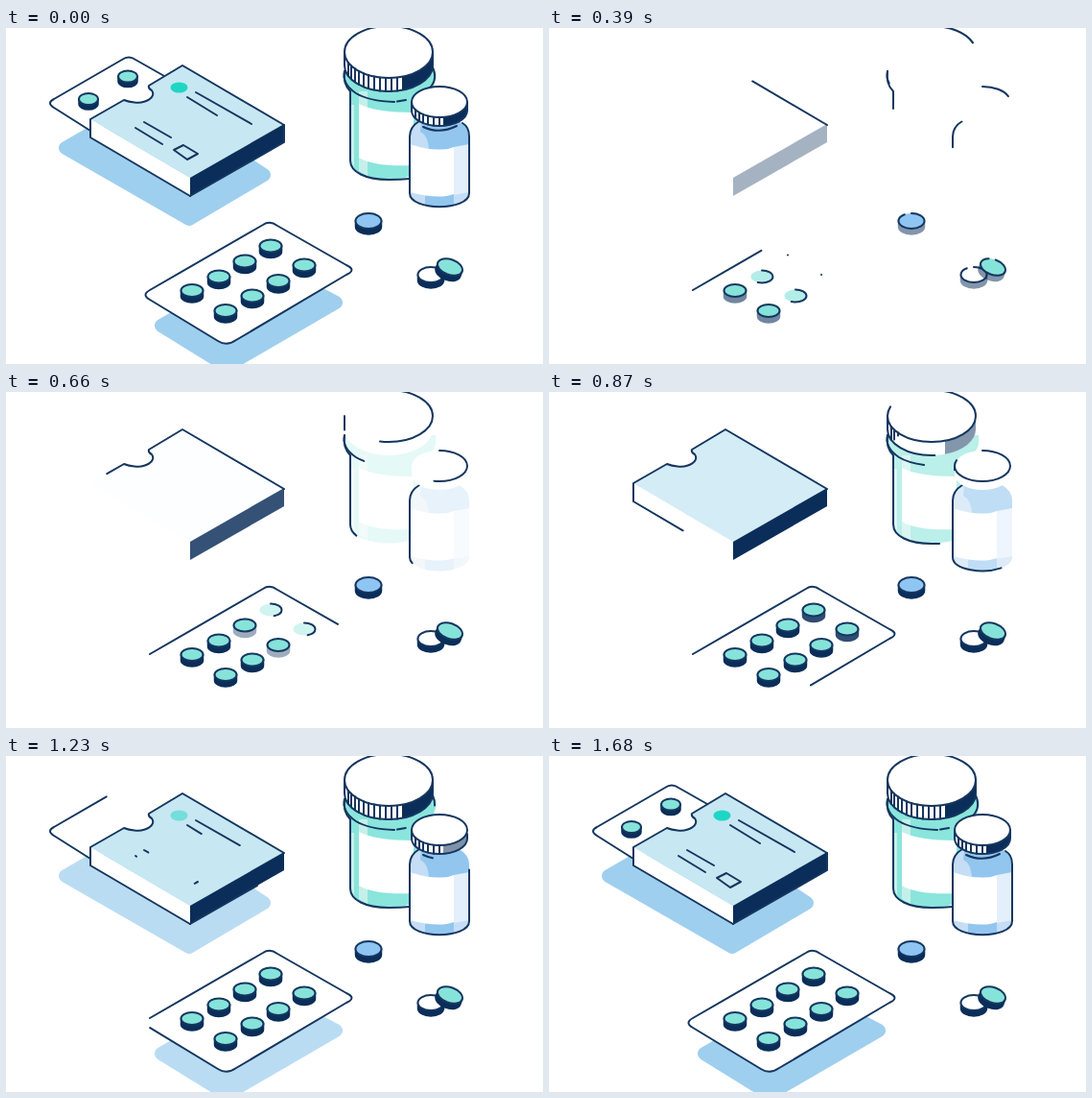
Animation of 560x350 px, one loop 1.78 s. Source, as an HTML page:

```html
<!DOCTYPE html>
<html lang="en">
<head>
<meta charset="utf-8">
<title>Medicine</title>
<style>
html, body { margin: 0; width: 100%; height: 100%; overflow: hidden; background: #fff; }
svg { display: block; width: 560px; height: 350px; }
[data-line] { fill: none; stroke: #15365f; stroke-width: 2; stroke-linecap: round; stroke-linejoin: round; }
.shadow { fill: #9fcfee; stroke: #9fcfee; stroke-width: 14; stroke-linejoin: round; }
.white { fill: #fff; }
.navy { fill: #0a2e59; }
</style>
</head>
<body>
<!-- data-line and data-fade hold "start duration" in ms -->
<svg id="stage" viewBox="0 0 560 350">
  <path class="shadow" data-fade="960 420" d="M62 125L150 74L269 153L191 199Z"/>
  <path class="shadow" data-fade="960 420" d="M162 310L270 247L344 286L230 352Z"/>

  <path class="white" d="M88 107L50 83Q42 78 50 74L121 33Q128 28 135 33L165 51L150 90Z"/>
  <path data-line="900 560" d="M88 107L50 83Q42 78 50 74L121 33Q128 28 135 33L165 50"/>
  <g id="sheetPills"></g>

  <path class="white" d="M88 95L192 156V175L88 114Z"/>
  <path fill="#c7e7f2" data-fade="600 400" d="M290 101L184 39L149 60Q148 63 152 65C157 72 146 79 134 77.500Q128 77 123 75L88 95L192 156Z"/>
  <path class="navy" data-fade="30 870" d="M192 156L290 100V119L192 175Z"/>
  <path data-line="25 1140" d="M290 101L184 39L149 60Q148 63 152 65C157 72 146 79 134 77.500Q128 77 123 75L88 95V114L192 175"/>
  <path data-line="1000 400" d="M192 175L290 119V101"/>
  <ellipse fill="#1fd6c4" data-fade="1060 340" cx="180.500" cy="62" rx="9" ry="5.500"/>
  <path data-line="1000 330" d="M198 67L256 100"/>
  <path data-line="1070 330" d="M189 72L220 91"/>
  <path data-line="1145 330" d="M144 98L172 114"/>
  <path data-line="1190 330" d="M135 104L163 121"/>
  <path data-line="1165 400" d="M200 131L189 137L175 127L185 122Z"/>

  <path class="white" d="M150 273L268 205Q275 200 283 206L355 247Q366 252 355 257L240 325Q230 332 221 326L150 283Q141 278 150 273Z"/>
  <path data-line="34 1340" d="M150 273L268 205Q275 200 283 206L355 247Q366 252 355 257L240 325Q230 332 221 326L150 283Q141 278 150 273"/>

  <g data-fade="400 850">
    <path fill="#8ae5dc" d="M353 45Q351 60 359 66V138C359 164 440 164 440 138V66Q450 60 448 45Z"/>
    <path fill="#c4f0e9" d="M359 80H363V147L359 138ZM368 66H377V154L368 149Z"/>
    <path class="white" d="M368 79Q385 88 425 88V143Q385 145 368 135Z"/>
  </g>
  <path data-line="60 1000" d="M353 45Q351 58 359 66V138C359 150 375 158 399 158Q411 158 421 157"/>
  <path data-line="60 1150" d="M353 45Q350 58 365 68Q378 76 405 77"/>
  <path data-line="1050 200" d="M408 76.500L417 75"/>
  <path data-line="1050 400" d="M445 41Q451 55 440 64"/>
  <path class="white" d="M353 25V39A46 27 0 0 0 445 39V25A46 27 0 0 0 353 25Z"/>
  <g id="bigRidges"></g>
  <path class="navy" data-fade="690 360" d="M413 50.700V64.700A46 27 0 0 0 445 39V25A46 27 0 0 1 413 50.700Z"/>
  <path data-line="520 680" d="M353 25V39A46 27 0 0 0 445 39V25"/>
  <path data-line="30 1200" d="M399 -2A46 27 0 0 1 399 52A46 27 0 0 1 399 -2"/>

  <path class="white" d="M431 97Q421 103 421 113V172C421 191 483 191 483 172V113Q483 103 473 97Z"/>
  <g data-fade="400 850">
    <path fill="#c5def5" d="M431 97Q421 103 421 113V172C421 191 483 191 483 172V113Q483 103 473 97Z"/>
    <path fill="#93c6ee" d="M433 97H472Q483 103 483 113V124H468L460 126H441Q440 112 432 108ZM437 172H467V185Q452 188 437 185Z"/>
    <path class="white" d="M421 121Q452 131 467 124V173Q452 179 421 171Z"/>
    <path fill="#e3effb" d="M467 124L483 121V171L467 174Z"/>
  </g>
  <path data-line="30 1500" d="M431 97Q421 103 421 113V172C421 191 483 191 483 172V113Q483 103 476 99"/>
  <path data-line="1050 500" d="M435 103Q452 111 470 102"/>
  <path class="white" d="M423 77V86A29 16 0 0 0 481 86V77A29 16 0 0 0 423 77Z"/>
  <g id="smallRidges"></g>
  <path class="navy" data-fade="1050 350" d="M456 93V102A29 16 0 0 0 481 86V77A29 16 0 0 1 456 93Z"/>
  <path data-line="800 500" d="M423 77V86A29 16 0 0 0 481 86V77"/>
  <path data-line="30 1200" d="M452 61A29 16 0 0 1 452 93A29 16 0 0 1 452 61"/>
  <g id="pills"></g>
</svg>
<script>
const LOOP = 1780, STEP = 30;
const TEAL = '#86e3da', BLUE = '#8fc5f2';
const add = (id, markup) => document.getElementById(id).insertAdjacentHTML('beforeend', markup);

function pill(id, x, y, start, fill, { rx = 11.5, ry = 6.5, h = 6, dur = 280, side = 190, turn = 0 } = {}) {
  const arc = `A${rx} ${ry} 0 0`;
  add(id, `<g transform="rotate(${turn} ${x} ${y})">
    <path class="navy" data-fade="${start + side} 200" stroke="#0a2e59" stroke-width="1.5"
      d="M${x - rx} ${y}v${h}${arc} 0 ${x + rx} ${y + h}v${-h}Z"/>
    <ellipse fill="${fill}" data-fade="${start + 60} 160" cx="${x}" cy="${y}" rx="${rx}" ry="${ry}"/>
    <path data-line="${start} ${dur}" d="M${x} ${y - ry}${arc} 1 ${x} ${y + ry}${arc} 1 ${x} ${y - ry}"/>
  </g>`);
}

// Vertical ridges hanging from the front rim of a lid
function ridges(id, xs, cx, cy, rx, ry, h, start, gap) {
  xs.forEach((x, i) => {
    const y = cy + ry * Math.sqrt(1 - ((x - cx) / rx) ** 2);
    add(id, `<path data-line="${start + i * gap} 100" d="M${x} ${y}v${h}"/>`);
  });
}

const small = { rx: 10, ry: 6, h: 5 };
pill('sheetPills', 86, 74, 1240, TEAL, small);
pill('sheetPills', 127, 50.5, 1270, TEAL, small);

[[194, 273.5, 229, 294.5], [222, 259, 257, 279], [249, 243, 284, 263.5], [276, 227, 311, 247]]
  .forEach(([x1, y1, x2, y2], i) => {
    const start = 90 + i * 147;
    pill('pills', x1, y1, start, TEAL);
    pill('pills', x2, y2, start, TEAL);
  });

const loose = { rx: 13.5, ry: 8, dur: 440, side: 247 };
pill('pills', 378, 201, 43, BLUE, loose);
pill('pills', 443, 257, 43, '#fff', loose);
pill('pills', 463, 249, 43, TEAL, { ...loose, turn: 20 });

ridges('bigRidges', [357, 360, 364, 368, 373, 378, 384, 390, 396, 402, 408], 399, 25, 46, 27, 14, 770, 35);
ridges('smallRidges', [427, 431, 435, 440, 446, 452], 452, 77, 29, 16, 9, 900, 35);

const parts = [...document.querySelectorAll('[data-line], [data-fade]')].map(el => {
  const line = 'line' in el.dataset;
  const [start, dur] = (el.dataset.line || el.dataset.fade).split(' ').map(Number);
  if (line) el.setAttribute('pathLength', 1);
  return { el, line, start, dur };
});

const ease = p => (1 - Math.cos(Math.PI * Math.min(1, Math.max(0, p)))) / 2;

function frame() {
  // The loop opens on the finished picture, then draws it again
  const t = Math.floor(performance.now() % LOOP / STEP) * STEP || LOOP;
  for (const { el, line, start, dur } of parts) {
    const p = ease((t - start) / dur);
    el.style.visibility = p > 0 ? 'visible' : 'hidden';
    if (line) el.style.strokeDasharray = p < 1 ? `${p} 2` : 'none';
    else el.style.opacity = p;
  }
  requestAnimationFrame(frame);
}
frame();
</script>
</body>
</html>
```
